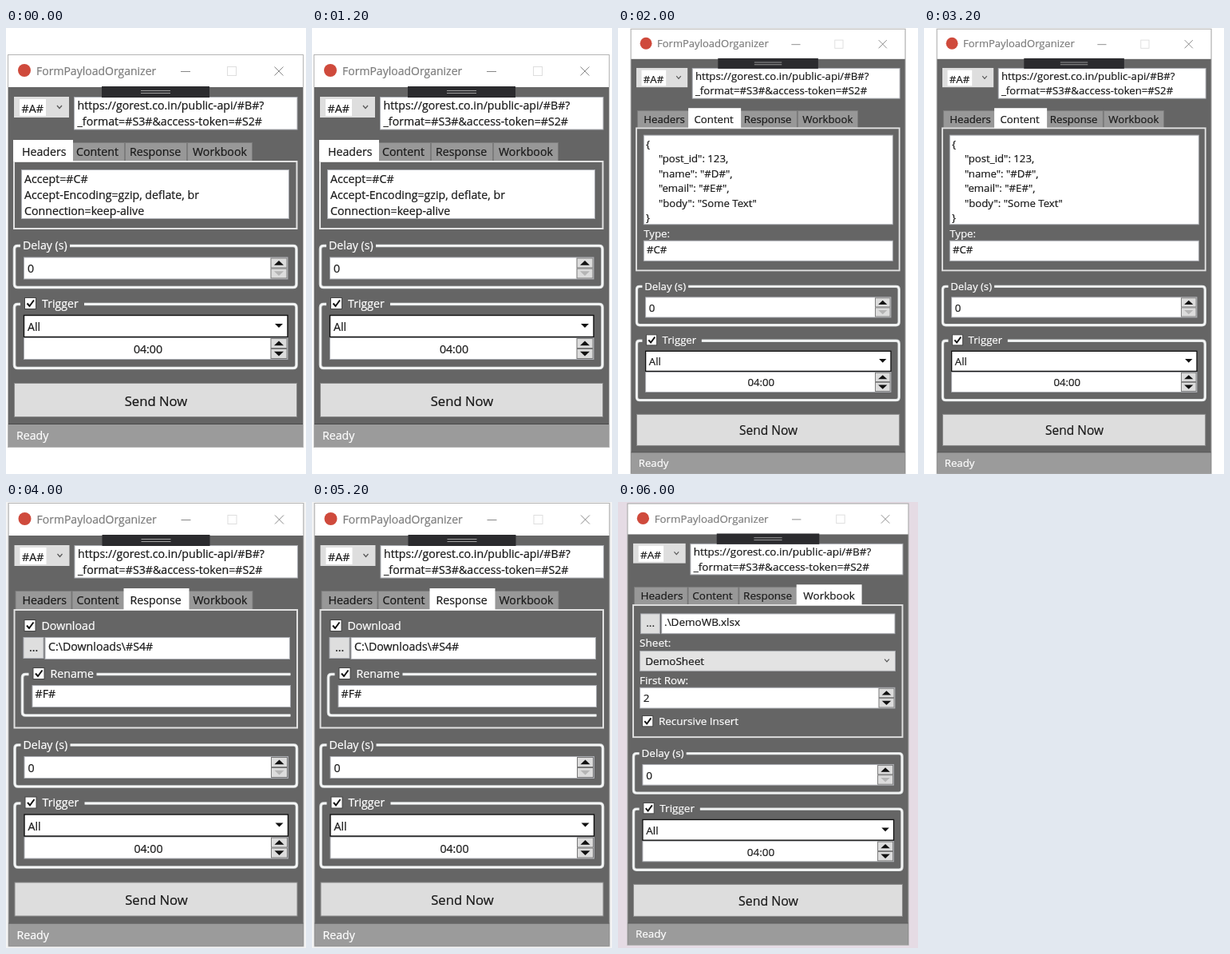
Recreate the animation shown at these times as an HTML page. Size 376 px wide and 558 px high, loop 8 s.

```html
<!DOCTYPE html>
<html lang="en">
<head>
<meta charset="utf-8">
<title>Scheduler tabs</title>
<style>
  html, body { margin: 0; width: 100%; height: 100%; overflow: hidden; background: #fff; }
  svg { display: block; width: 376px; height: 558px; }
  text { font: 14.2px "Open Sans", "Noto Sans", sans-serif; white-space: pre; stroke-width: .22px; }
</style>
</head>
<body>
<svg id="stage" viewBox="0 0 376 558"></svg>
<script>
const BODY = '#656565', EDGE = '#abadb3', INK = '#1a1a1a';

const rect = (x, y, w, h, fill, stroke = 'none', sw = 1) =>
  `<rect x="${x}" y="${y}" width="${w}" height="${h}" fill="${fill}" stroke="${stroke}" stroke-width="${sw}"/>`;
const line = (d, color, sw = 1) =>
  `<path d="${d}" fill="none" stroke="${color}" stroke-width="${sw}"/>`;
const text = (x, y, str, color = INK, extra = '') =>
  `<text x="${x}" y="${y}" fill="${color}" stroke="${color}" ${extra}>${str.replace(/&/g, '&amp;')}</text>`;
const label = (x, y, str) => text(x, y, str, '#fff');
const field = (x, y, w, h, fill = '#fff') => rect(x + .5, y + .5, w - 1, h - 1, fill, EDGE);
const chevron = (x, y) => line(`M${x - 3} ${y - 2}l3 3.5l3 -3.5`, '#555', 1.2);
const dots = (x, y) => field(x, y, 26, 27, '#dedede') + text(x + 7.5, y + 17.5, '...');

function check(x, y, str) {
  return rect(x + .5, y + .5, 14, 14, '#fff', '#444') +
    line(`M${x + 3.5} ${y + 7.5}l3 3.5l5.5 -7.5`, '#111', 2) + label(x + 22, y + 12.5, str);
}

function arrow(x, y, dir, color) {
  return rect(x + .5, y + .5, 20, 12, '#dcdcdc', '#777') +
    `<path d="M${x + 4.5} ${y + 6.5 + 2.7 * dir}h12l-6 ${-5.6 * dir}z" fill="${color}"/>`;
}

function spinner(x, y, w, value, down = '#111') {
  return field(x, y, w, 28) + value +
    arrow(x + w - 22, y + 1, 1, '#111') + arrow(x + w - 22, y + 14, -1, down);
}

// Light double stroke shared by all group frames
const frame = d => line(d, '#d9dddd', 3.6) + line(d, '#fff', 1.4);

// Rounded frame whose top edge is interrupted for a caption
function group(y, h, gap) {
  const top = y + 1.5, v = h - 11;
  return frame(`M14.5 ${top}h345.5q4 0 4 4v${v}q0 4 -4 4h-345.5q-4 0 -4 -4v${-v}q0 -4 4 -4z`) +
    rect(18, y - 2, gap, 7, BODY);
}

const headers = () => field(19, 177, 336, 62) +
  ['Accept=#C#', 'Accept-Encoding=gzip, deflate, br', 'Connection=keep-alive']
    .map((s, i) => text(23, 193.5 + 20 * i, s)).join('');

const content = () => field(19.5, 176, 336.5, 121) +
  ['{', '"post_id": 123,', '"name": "#D#",', '"email": "#E#",', '"body": "Some Text"', '}']
    .map((s, i) => text(i % 5 ? 40 : 23, 193.5 + 19.8 * i, s)).join('') +
  label(20, 313.5, 'Type:') + field(19.5, 318, 336.5, 28) + text(24, 335, '#C#');

const response = () => check(22, 179, 'Download') + dots(21, 201) +
  field(48, 201, 307.5, 28) + text(52.5, 217.5, 'C:\\Downloads\\#S4#') +
  frame('M356 247.5H24q-4 0 -4 4V295q0 4 4 4H356') + rect(28, 244, 85, 7, BODY) +
  check(33, 239, 'Rename') + field(32, 261, 324.5, 28) + text(36, 277, '#F#');

const workbook = () => dots(19.5, 178) + field(47, 178, 308, 27) +
  text(51, 194, '.\\DemoWB.xlsx') + label(18.5, 221.5, 'Sheet:') +
  field(18.5, 227, 337, 27, '#e3e3e3') + text(26, 245.5, 'DemoSheet') + chevron(344, 240) +
  label(18.5, 270.5, 'First Row:') + spinner(18.5, 275, 336.5, text(23.5, 294, '2')) +
  check(21.5, 312, 'Recursive Insert');

const tabs = [
  { name: 'Headers', x: 11, w: 71, tx: 20 },
  { name: 'Content', x: 82, w: 67, tx: 88 },
  { name: 'Response', x: 149, w: 78, tx: 155 },
  { name: 'Workbook', x: 227, w: 82, tx: 234 }
];

// Each view: page content, panel height, window placement and colour behind it
const views = [
  { page: headers, h: 86, x: 0, y: 0, k: 1, back: '#fff' },
  { page: content, h: 193.5, x: 13.7, y: -30, k: .93, back: '#fff' },
  { page: response, h: 149.5, x: .5, y: -32, k: 1, back: '#f4f4f4' },
  { page: workbook, h: 175.5, x: 9.5, y: -30, k: .952, back: '#e5dbe4' }
];

function tab(t, on) {
  return on ? rect(t.x - 2, 140, t.w + 4, 27, '#fff')
    : rect(t.x + .5, 143.5, t.w - 1, 23, '#989898', '#7c7c7c');
}

function titleBar() {
  return rect(3, 34, 369, 40, '#fff') +
    '<circle cx="23" cy="53" r="8" fill="#cf4a3c"/>' +
    text(38, 58.5, 'FormPayloadOrganizer', '#7d7d7d', 'style="font-size:14px"') +
    line('M219 54.5h12', '#888') + rect(277.5, 48.5, 11, 11, 'none', '#dedede') +
    line('M336.5 48.5l11 11m0 -11l-11 11', '#888');
}

function request() {
  return rect(10, 86, 69, 26, '#dedede') + rect(17, 89, 33, 21, '#fff') +
    text(19.5, 106, '#A#') + chevron(67, 99) +
    field(85, 86, 280.5, 41.5) +
    text(89.5, 102, 'https://gorest.co.in/public-api/#B#?') +
    text(89.5, 122, '_format=#S3#&access-token=#S2#') +
    rect(120, 73, 135, 14, '#2b2b2e') + line('M169 78.5h37m-37 3h37', '#a0a0a0');
}

function controls() {
  return group(271, 55, 62) + label(21, 277, 'Delay (s)') +
    spinner(22, 286.5, 331.5, text(27, 306, '0'), '#b5b5b5') +
    group(344, 83, 80) + check(23, 337, 'Trigger') +
    spinner(22, 387, 331.5, text(178, 407, '04:00', INK, 'text-anchor="middle"')) +
    rect(22.5, 359.5, 330.5, 27, '#fff', '#111', 1.4) + text(27, 379, 'All') +
    '<path d="M337 370h10l-5 5z" fill="#111"/>' +
    rect(10.5, 444.5, 354, 42, '#dddddd', '#8a8a8a') +
    text(188, 472.5, 'Send Now', INK, 'text-anchor="middle" style="font-size:16.7px"') +
    rect(3, 495, 369, 29, '#9b9b9b') + line('M3 495.5H372', '#484848') +
    label(13, 515, 'Ready');
}

function render(v, i) {
  const shift = v.h - 86;
  return `<g>` + rect(0, 0, 376, 558, v.back) +
    `<g transform="translate(${v.x} ${v.y}) scale(${v.k})">` +
    rect(2.5, 33.5, 370, 491 + shift, BODY, '#b4b4b4') + titleBar() + request() +
    tabs.map((t, n) => n === i ? '' : tab(t)).join('') +
    rect(10, 167, 354.5, v.h - 2, BODY, '#e2e2e2', 2) + tab(tabs[i], true) +
    tabs.map(t => text(t.tx, 160, t.name)).join('') + v.page() +
    `<g transform="translate(0 ${shift})">${controls()}</g></g></g>`;
}

const stage = document.getElementById('stage');
stage.innerHTML = views.map(render).join('');
const layers = [...stage.children];

function draw() {
  const now = Math.floor(performance.now() % 8000 / 2000);
  layers.forEach((g, i) => g.style.display = i === now ? '' : 'none');
  requestAnimationFrame(draw);
}
draw();
</script>
</body>
</html>
```
